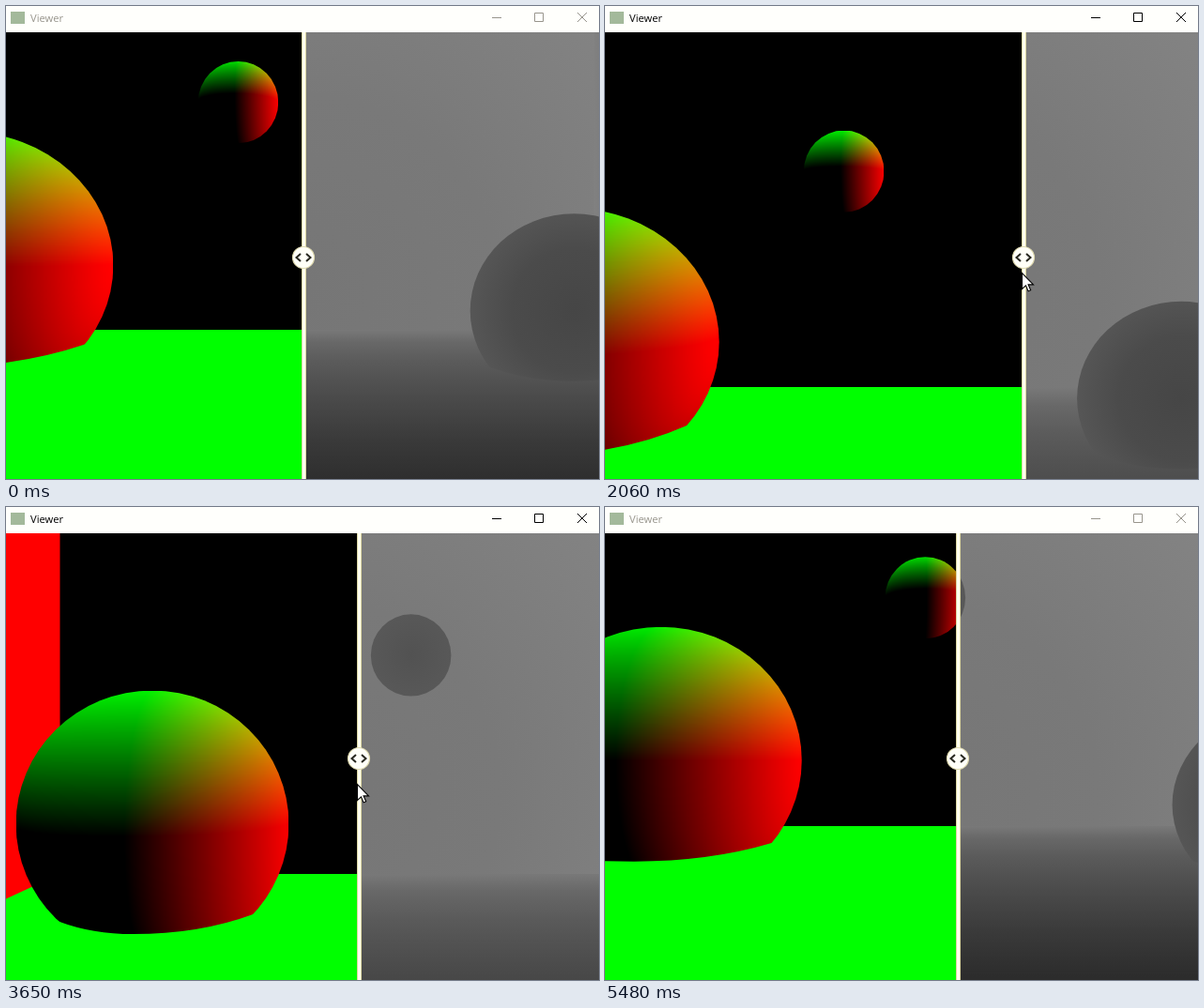
These frames come from a looping animation (632 px wide and 504 px high, 5.52 s). An HTML page with a canvas:

```html
<!DOCTYPE html>
<html lang="en">
<head>
<meta charset="utf-8">
<title>Viewer</title>
<style>
html, body { margin: 0; width: 100%; height: 100%; overflow: hidden; background: #fffffb; }
#stage { position: relative; width: 632px; height: 504px; overflow: hidden; }
canvas, svg { position: absolute; left: 0; top: 0; display: block; }
text { font: 11.2px "Open Sans", "Noto Sans", sans-serif; }
</style>
</head>
<body>
<div id="stage">
  <canvas id="view" width="632" height="504"></canvas>
  <svg width="632" height="504" viewBox="0 0 632 504">
    <rect width="632" height="28" fill="#fffffc"/>
    <rect x="5" y="6" width="15" height="13" fill="#a3b99b"/>
    <text id="label" x="26" y="17">Viewer</text>
    <path id="buttons" d="M518 12.5h10M563.5 7.5h9v9h-9zM609 7l10 10M619 7l-10 10" fill="none"/>
    <g id="slider">
      <rect x="-2" y="28" width="5" height="476" fill="#dcd7a4"/>
      <rect x="-1" y="28" width="3" height="476" fill="#fffff0"/>
      <circle cy="268" r="11.5" fill="#fffff8" stroke="#dfdab0" stroke-width="1.2"/>
      <path d="M-3 264l-4.5 4l4.5 4M3 264l4.5 4l-4.5 4" fill="none" stroke="#282820" stroke-width="2"/>
    </g>
    <path id="cursor" d="M0 0V17L4 13.4L6.6 19.4L9.2 18.3L6.6 12.4H12Z" fill="#fff" stroke="#000" stroke-width="1.1"/>
  </svg>
</div>
<script>
const LOOP = 5520, W = 632, TOP = 28, BOTTOM = 504;
const MID_X = 316, MID_Y = 266, FOCAL = 750;
const byId = id => document.getElementById(id);
const ctx = byId('view').getContext('2d');
const buttons = byId('buttons'), label = byId('label'), slider = byId('slider'), cursor = byId('cursor');

// [time, split x, cursor x, cursor y]
const drag = [
  [1000, 317, 345, 215], [1230, 317, 318, 268], [1470, 339, 340, 271], [2060, 446, 444, 284],
  [2940, 217, 220, 292], [3650, 376, 374, 295], [4000, 376, 400, 310]
];

function dragAt(t, field) {
  if (t <= drag[0][0]) return drag[0][field];
  for (let i = 1; i < drag.length; i++) {
    const a = drag[i - 1], b = drag[i];
    if (t < b[0]) {
      const p = (t - a[0]) / (b[0] - a[0]);
      return a[field] + (b[field] - a[field]) * p * p * (3 - 2 * p);
    }
  }
  return drag[drag.length - 1][field];
}

const N = 200;
const ball = document.createElement('canvas');
ball.width = ball.height = N;
const ballCtx = ball.getContext('2d');
const pixels = ballCtx.createImageData(N, N);

// Casts a ray per pixel at a unit sphere; red and green are its clamped x and y normals
function shadeNormals({ x, y, rx, ry }) {
  const depth = FOCAL / ry, shrink = 1 - 1 / (depth * depth);
  const X = (x - MID_X) * shrink / ry, Y = (MID_Y - y) * shrink / ry, Z = depth;
  const reach = X * X + Y * Y + Z * Z - 1;
  for (let j = 0, k = 0; j < N; j++) {
    const dy = MID_Y - y - ry * ((j + .5) * 2 / N - 1);
    for (let i = 0; i < N; i++, k += 4) {
      const dx = x + rx * ((i + .5) * 2 / N - 1) - MID_X;
      const a = dx * dx + dy * dy + FOCAL * FOCAL;
      const b = dx * X + dy * Y + FOCAL * Z;
      const hit = (b - Math.sqrt(Math.max(0, b * b - a * reach))) / a;
      pixels.data[k] = 255 * (hit * dx - X);
      pixels.data[k + 1] = 255 * (hit * dy - Y);
      pixels.data[k + 3] = 255;
    }
  }
  ballCtx.putImageData(pixels, 0, 0);
}

function stops(gradient, list) {
  for (const [at, level] of list) gradient.addColorStop(at, `rgb(${level},${level},${level})`);
  return gradient;
}

function polygon(points, fill) {
  ctx.beginPath();
  for (const [x, y] of points) ctx.lineTo(x, y);
  ctx.fillStyle = fill;
  ctx.fill();
}

// A sphere known by its inner side edge, widened by perspective away from the middle
function sideSphere(edge, dir, y, ry) {
  const off = (edge + dir * ry - MID_X) / FOCAL;
  const rx = ry * (1 + off * off / 2);
  return { x: edge + dir * rx, y, rx, ry };
}

function onOutline({ x, y, rx, ry }, dir, py) {
  const dy = (py - y) / ry;
  return [x + dir * rx * Math.sqrt(Math.max(0, 1 - dy * dy)), py];
}

function sceneAt(t) {
  const u = t * .0010082 - 2.578, s = Math.sin(u), c = Math.cos(u);
  const small = { x: 316.5 + 129 * s, y: 138.7 + 42.7 * c, rx: 42.8, ry: 43.6, depth: [[0, 82], [1, 88]] };
  const side = sideSphere(575.5 + 151 * s, 1, 370.5 + 54.3 * c, 103.3);
  const big = sideSphere(184.5 + 131 * s, -1, 316.5 + 47.3 * c, 142.3);
  side.depth = [[0, 70], [.6, 75], [1, 86]];
  side.cut = {
    right: onOutline(side, 1, side.y + 60),
    low: [side.x, side.y + 75],
    left: onOutline(side, -1, side.y + 60)
  };
  big.depth = [[0, 66], [.6, 73], [1, 85]];
  big.cut = {
    right: onOutline(big, 1, 406 + 50 * c + 6 * s),
    low: [2.5 + 149 * s, 430.7 + 54 * c],
    left: onOutline(big, -1, 428 + 52 * c - 11 * s)
  };
  return {
    c,
    horizon: 374.7 + 35.5 * c,
    leftEdge: -38 + 107 * s,
    rightEdge: 684 + 107 * s,
    slope: .39 + .16 * c,
    spheres: [small, side, big]
  };
}

// Keeps the part of a sphere above the curve where it meets the floor
function clipAtFloor({ right, low, left }) {
  const bend = end => low[0] + (end[0] - low[0]) * .55;
  ctx.beginPath();
  ctx.moveTo(left[0] - 200, 0);
  ctx.lineTo(right[0] + 200, 0);
  ctx.lineTo(right[0] + 200, right[1]);
  ctx.lineTo(...right);
  ctx.quadraticCurveTo(bend(right), low[1], ...low);
  ctx.quadraticCurveTo(bend(left), low[1], ...left);
  ctx.lineTo(left[0] - 200, left[1]);
  ctx.closePath();
  ctx.clip();
}

function drawSpheres(spheres, paint) {
  for (const sphere of spheres) {
    const { x, y, rx, ry, cut } = sphere;
    if (x + rx < 0 || x - rx > W) continue;
    ctx.save();
    if (cut) clipAtFloor(cut);
    ctx.beginPath();
    ctx.ellipse(x, y, rx, ry, 0, 0, 7);
    paint(sphere);
    ctx.restore();
  }
}

function drawRoom(scene, back, floor, leftWall, rightWall) {
  const { leftEdge: l, rightEdge: r, slope } = scene;
  const h = Math.round(scene.horizon);
  ctx.fillStyle = back;
  ctx.fillRect(0, TOP, W, BOTTOM);
  ctx.fillStyle = floor;
  ctx.fillRect(0, h, W, BOTTOM);
  if (l > 0) polygon([[0, TOP], [l, TOP], [l, h], [0, h + l * slope]], leftWall);
  if (r < W) polygon([[W, TOP], [r, TOP], [r, h], [W, h + (W - r) * slope]], rightWall);
}

function drawNormals(scene) {
  drawRoom(scene, '#000', '#0f0', '#f00', '#000');
  drawSpheres(scene.spheres, sphere => {
    const { x, y, rx, ry } = sphere;
    shadeNormals(sphere);
    ctx.clip();
    ctx.drawImage(ball, x - rx, y - ry, rx * 2, ry * 2);
  });
}

function drawDepth(scene) {
  const { c, horizon, leftEdge, rightEdge } = scene;
  const back = stops(ctx.createRadialGradient(317, 305, 0, 317, 305, 420), [[0, 118], [.5, 121], [1, 131]]);
  const unit = 42 + 10 * c;
  const floor = stops(ctx.createLinearGradient(0, horizon, 0, horizon + unit * 5), [
    [0, 121], [.08, 104], [.2, 91], [.32, 82], [.44, 74], [.7, 58], [1, 44]
  ]);
  const wall = (edge, dir) => stops(ctx.createLinearGradient(edge, 0, edge + dir * 60, 0), [
    [0, 129], [.3, 120], [1, 104]
  ]);
  drawRoom(scene, back, floor, wall(leftEdge, -1), wall(rightEdge, 1));
  drawSpheres(scene.spheres, ({ x, y, rx, depth }) => {
    ctx.fillStyle = stops(ctx.createRadialGradient(x, y, 0, x, y, rx), depth);
    ctx.fill();
  });
}

function within(x, width, draw, scene) {
  ctx.save();
  ctx.beginPath();
  ctx.rect(x, TOP, width, BOTTOM - TOP);
  ctx.clip();
  draw(scene);
  ctx.restore();
}

function render(t) {
  const scene = sceneAt(t), split = Math.round(dragAt(t, 1));
  within(0, split, drawNormals, scene);
  within(split, W - split, drawDepth, scene);

  const ink = t >= 1230 && t < 5220 ? '#000' : '#98958c';
  buttons.setAttribute('stroke', ink);
  label.setAttribute('fill', ink);
  slider.setAttribute('transform', `translate(${split} 0)`);
  cursor.setAttribute('transform', `translate(${dragAt(t, 2) + .5} ${dragAt(t, 3) + .5})`);
  cursor.setAttribute('visibility', t >= 1000 && t < 4000 ? 'visible' : 'hidden');
}

const start = performance.now();
function tick() {
  render((performance.now() - start) % LOOP);
  requestAnimationFrame(tick);
}
tick();
</script>
</body>
</html>
```
